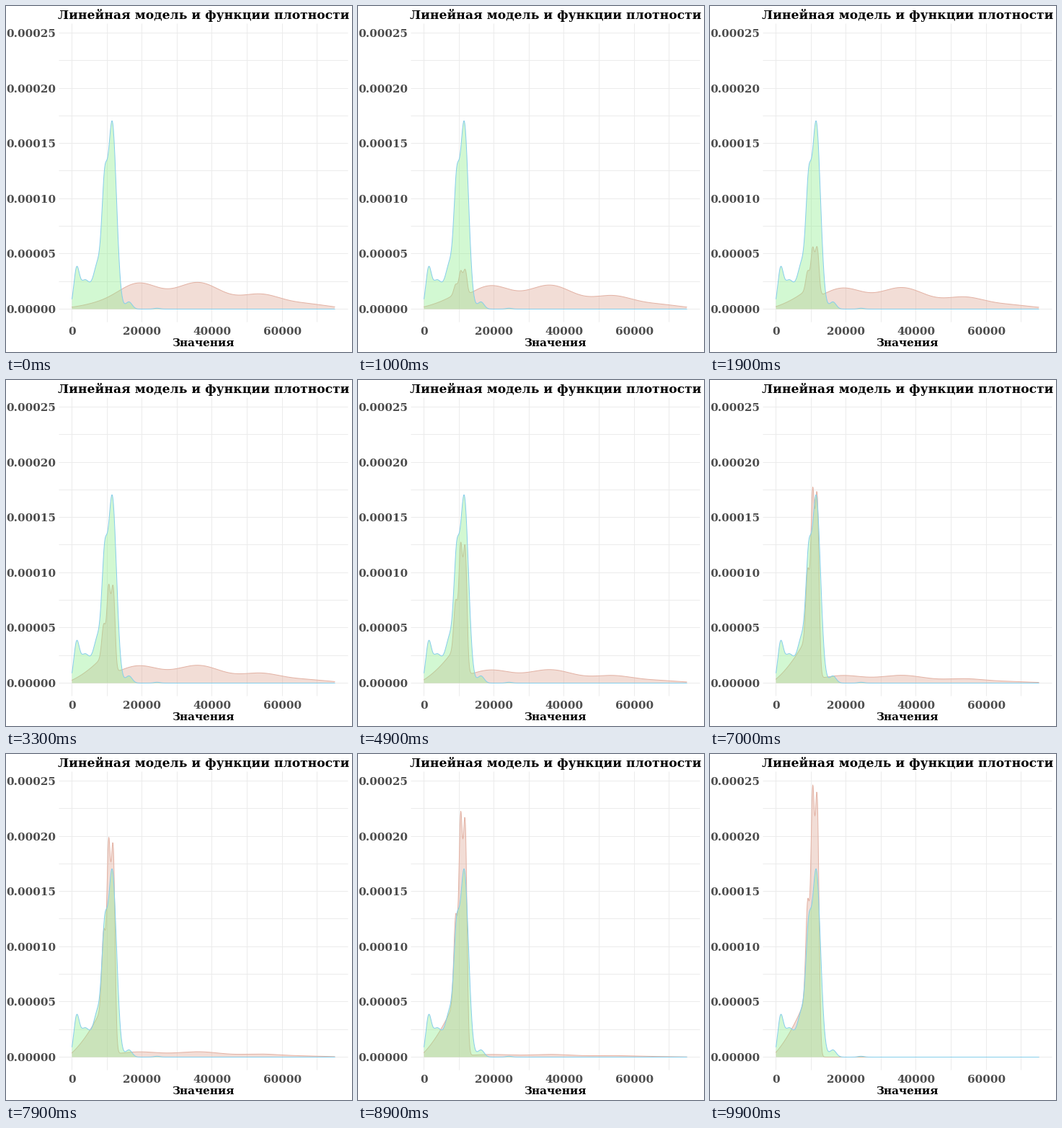
Write a matplotlib script that moves like this. It is 480x480 px and loops after 10000 ms.

```python
import numpy as np
import matplotlib.pyplot as plt
from matplotlib.animation import FuncAnimation

SIZE, DPI, FRAMES, STEP = 480, 100, 100, 100
PX = 72 / DPI
LEFT, BASE = 91, 420
GRAY = "#4d4d4d"

plt.rcParams["font.family"] = "DejaVu Serif"
plt.rcParams["font.weight"] = "bold"

xs = np.linspace(LEFT, 455.5, 730)


def bumps(*parts):
    """Sum of bell curves given as (center, spread, height), in pixels."""
    return sum(h * np.exp(-((xs - c) / s) ** 2 / 2) for c, s, h in parts)


# broad spread of values: three humps with a soft tail on both sides
wide = bumps((132, 30, 6.8), (184, 28, 33.2), (266, 33, 36.5),
             (352, 28, 19), (415, 32, 7))

# rising ramp with a sharp cut-off, topped by a shoulder and twin peaks
u = xs - LEFT - 2
ramp = (9 + 1.2 * u + 0.016 * u ** 2) / (1 + np.exp(np.minimum(xs - 151, 50)))
narrow = ramp + bumps((135, 2.6, 128), (141.8, 2.3, 252), (148, 2.6, 242))

# density that stays still
fixed = bumps((97.2, 3.7, 45), (109, 8, 40), (127.2, 6, 60), (136, 3.7, 124),
              (146.8, 5.9, 259), (170, 4.5, 10), (209, 4, 1.2))

fig = plt.figure(figsize=(SIZE / DPI, SIZE / DPI), dpi=DPI, facecolor="white")
ax = fig.add_axes([0, 0, 1, 1])
# whole numbers fall on pixel centers
ax.set(xlim=(-0.5, SIZE - 0.5), ylim=(SIZE - 0.5, -0.5))
ax.axis("off")


def label(x, y, text, size, color="black", ha="center", va="baseline"):
    ax.text(x, y, text, fontsize=size * PX, color=color, ha=ha, va=va)


def grid(x, y):
    ax.plot(x, y, color="#ebebeb", lw=PX, snap=False,
            solid_capstyle="butt", zorder=1)


for k in range(8):
    x = round(LEFT + 48.6 * k)
    grid([x, x], [24, 438])
    if k % 2 == 0:
        label(x, 451, str(10000 * k), 15.2, GRAY, va="center")
for k in range(11):
    y = round(BASE - 38.3 * k)
    grid([73, 474], [y, y])
    if k % 2 == 0:
        label(68.5, y, f"{k * 2.5e-5:.5f}", 15.2, GRAY, "right", "center_baseline")

label(274, 18, "Линейная модель и функции плотности", 17.1)
label(273.5, 471, "Значения", 15.2)


def outline(h):
    return np.column_stack([np.r_[xs, xs[-1], xs[0]], BASE - np.r_[h, 0, 0]])


def density(h, fill, edge, z):
    area = plt.Polygon(outline(h), fc=fill, ec="none", alpha=0.4, zorder=z)
    ax.add_patch(area)
    line, = ax.plot(xs, BASE - h, color=edge, lw=PX, snap=False, zorder=z + 0.1)
    return area, line


area, line = density(wide, "#dfaa99", "#e3b2a4", 2)
density(fixed, "lightgreen", "skyblue", 3)


def update(i):
    w = i / (FRAMES - 1)
    h = (1 - w) * wide + w * narrow
    area.set_xy(outline(h))
    line.set_ydata(BASE - h)
    return area, line


anim = FuncAnimation(fig, update, frames=FRAMES, interval=STEP,
                     repeat=True, repeat_delay=0, blit=False)
plt.show()
```
